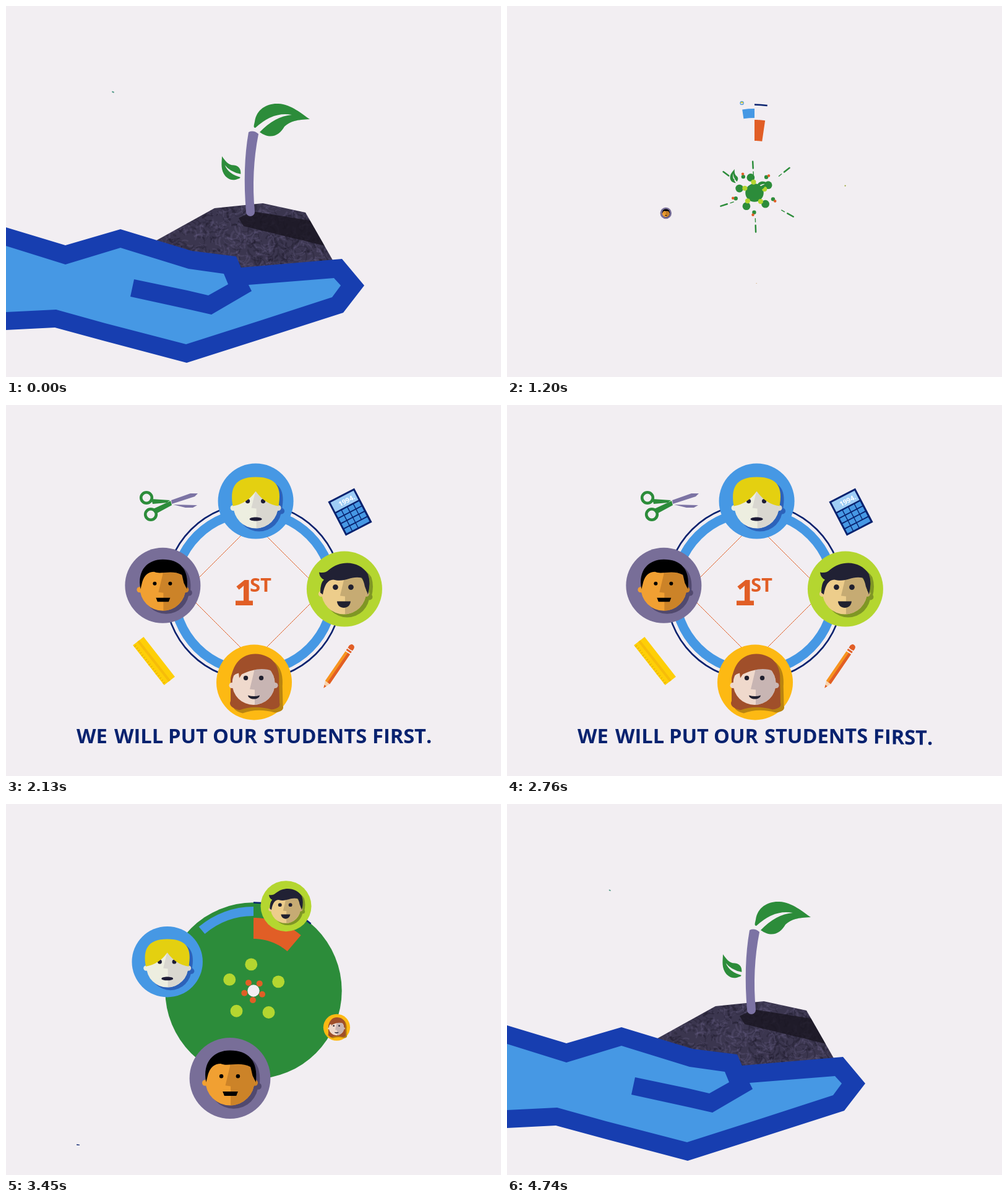
An HTML page with a canvas that plays this animation: 800x600 px, repeating every 5.4 s.

```html
<!DOCTYPE html>
<html lang="en">
<head>
<meta charset="utf-8">
<title>Growing students</title>
<style>
html, body { margin: 0; width: 100%; height: 100%; overflow: hidden; background: #f2eef2; }
canvas { display: block; width: 800px; height: 600px; }
</style>
</head>
<body>
<canvas id="stage" width="800" height="600"></canvas>
<script>
const ctx = document.getElementById('stage').getContext('2d');
const BG = '#f2eef2', GREEN = '#2c8c3a', LIME = '#b4d630', ORANGE = '#e15e26';
const NAVY = '#08226f', BLUE = '#4698e4', ROYAL = '#173eb0';
const LOOP = 5400, TURN = 4770, CX = 400, CY = 302, TAU = Math.PI * 2;

const clamp = x => Math.max(0, Math.min(1, x));
const mix = (a, b, k) => a + (b - a) * k;
const span = (u, a, b) => clamp((u - a) / (b - a));
const smooth = (u, a, b) => { const x = span(u, a, b); return x * x * (3 - 2 * x); };
const rad = deg => deg * Math.PI / 180;
const backOut = x => 1 + 2.2 * (x - 1) ** 3 + 1.2 * (x - 1) ** 2;

// Each key is [time, value, value, ...]
function track(u, keys) {
  let i = 1;
  while (i < keys.length - 1 && u > keys[i][0]) i++;
  const a = keys[i - 1], b = keys[i], k = span(u, a[0], b[0]);
  return a.slice(1).map((v, n) => mix(v, b[n + 1], k));
}

function disc(x, y, r, color) {
  if (r <= 0) return;
  ctx.fillStyle = color;
  ctx.beginPath();
  ctx.arc(x, y, r, 0, TAU);
  ctx.fill();
}

function poly(points, color) {
  ctx.fillStyle = color;
  ctx.beginPath();
  points.forEach(p => ctx.lineTo(p[0], p[1]));
  ctx.closePath();
  ctx.fill();
}

function box(x, y, w, h, color) {
  ctx.fillStyle = color;
  ctx.fillRect(x, y, w, h);
}

function placed(x, y, angle, scale, draw) {
  if (scale <= 0.001) return;
  ctx.save();
  ctx.translate(x, y);
  ctx.rotate(rad(angle));
  ctx.scale(scale, scale);
  draw();
  ctx.restore();
}

// ---- hand, soil and plant ----

// x, y, vertical shift when the hand flexes
const HAND = [[0,358,5],[96,387,7],[185,361,6],[300,396,3],[372,405,2],[380,423,1],[543,409,-11],
  [579,452,-14],[545,496,-11],[408,540,-1],[292,577,-5],[160,542,4],[79,520,8],[0,524,6]];
const PALM = [[0,388,5],[96,418,7],[185,391,6],[295,425,2],[352,433,1],[359,450,1],[327,468,1],[293,460,1],
  [207,442,3],[201,470,2],[297,491,-3],[332,499,-2],[397,461,0],[392,451,-1],[530,440,-11],[541,452,-11],
  [527,471,-10],[410,509,0],[291,547,-5],[160,513,4],[81,491,8],[0,495,6]];
const flexed = (shape, k) => shape.map(([x, y, d]) => [x, y + d * k]);

const soilTexture = (() => {
  const c = document.createElement('canvas'), g = c.getContext('2d');
  c.width = 300; c.height = 120;
  let seed = 7;
  const rnd = () => (seed = seed * 16807 % 2147483647) / 2147483647;
  g.fillStyle = '#3b364f';
  g.fillRect(0, 0, 300, 120);
  for (let i = 0; i < 900; i++) {
    const x = rnd() * 300, y = rnd() * 120, a = rnd() * TAU, len = 3 + rnd() * 9;
    g.strokeStyle = rnd() < 0.52 ? 'rgba(112,103,145,.22)' : 'rgba(22,19,34,.26)';
    g.lineWidth = 0.6 + rnd() * 3;
    g.beginPath();
    g.moveTo(x, y);
    g.quadraticCurveTo(x + len * Math.cos(a + 0.6), y + len * Math.sin(a + 0.6),
      x + 1.6 * len * Math.cos(a), y + 1.6 * len * Math.sin(a));
    g.stroke();
  }
  return c;
})();

const LEAF = new Path2D('M-2-3C-6-3-4-8-3-13C0-34 18-43 35-42C57-41 73-25 86-17C65-16 55-14 45-5C37 9 23 17 5 4Q30-22 57-24Q27-30-2-3Z');
const leaf = (x, y, angle, scale) => placed(x, y, angle, scale, () => {
  ctx.fillStyle = GREEN;
  ctx.fill(LEAF);
});

function stem(top) {
  if (top > 328) return;
  const k = (333 - top) / 125;
  ctx.fillStyle = '#7c73a4';
  ctx.beginPath();
  ctx.moveTo(388, 333);
  ctx.quadraticCurveTo(mix(387, 382, k), mix(333, 262, k), mix(388, 392, k), top - 3);
  ctx.quadraticCurveTo(mix(394, 400, k), top - 7, mix(402, 408, k), top);
  ctx.quadraticCurveTo(mix(400, 396, k), mix(333, 268, k), 402, 333);
  ctx.arc(395, 333, 7, 0, Math.PI);
  ctx.fill();
}

function garden(u) {
  if (u > 1150) return;
  const k = smooth(u, 170, 790), fall = span(u, 840, 1130) ** 2 * 300;
  ctx.save();
  ctx.translate(0, fall);
  ctx.save();
  ctx.beginPath();
  [[236,383],[337,327],[415,319],[484,334],[mix(532,527,k),418],[380,440],[240,440]].forEach(p => ctx.lineTo(...p));
  ctx.clip();
  ctx.drawImage(soilTexture, 236, 318);
  const reach = 1 - smooth(u, 830, 940);
  poly([[376,343],[398,332],[mix(400,mix(492,463,k),reach),347],[mix(395,mix(516,457,k),reach),mix(388,374,k)],[384,356]], 'rgba(24,21,32,.8)');
  ctx.restore();
  stem(track(u, [[170,207],[450,222],[810,278],[930,335]])[0]);
  poly(flexed(HAND, k), ROYAL);
  poly(flexed(PALM, k), BLUE);
  ctx.restore();
}

function leaves(u) {
  if (u > 1320) return;
  leaf(...track(u, [[170,405,200,0,1],[480,406,212,3,1],[810,402,237,-7.5,1],[1200,405,294,0,.25],[1320,400,302,0,0]]));
  leaf(...track(u, [[170,379,275,-122,.5],[500,372,265,-124,.5],[620,345,200,-145,.5],[710,284,172,-180,.48],
    [810,234,204,-211,.46],[960,240,270,-190,.4],[1200,370,285,-86,.25],[1290,400,302,-50,0]]));
  const grow = span(u, 570, 740), fade = span(u, 790, 960);
  if (grow > fade && u < 960) {
    ctx.strokeStyle = LIME;
    ctx.lineWidth = 4;
    ctx.beginPath();
    ctx.moveTo(367, 263);
    ctx.bezierCurveTo(350, 180, 323, 166, 274, 173);
    ctx.setLineDash([0, 150 * fade, 150 * (grow - fade), 300]);
    ctx.stroke();
    ctx.setLineDash([]);
  }
  if (u < 150) placed(mix(173, 138, u / 150), 139 + u / 60, 25, 1 - u / 160, () => {
    ctx.fillStyle = '#4a9583';
    ctx.fillRect(-1.5, -1, 3.5, 2);
  });
}

// ---- bursts ----

const around = (x, y, r, start, step, draw) => {
  for (let i = 0; i < 5; i++) {
    const a = rad(start + step * i);
    draw(x + r * Math.cos(a), y + r * Math.sin(a));
  }
};

function dashes(u) {
  if (u < 700 || u > 1270) return;
  const [r, len, width, y] = track(u, [[700,20,0,1,345],[810,128,22,5,350],[960,245,22,5,345],[1200,58,11,2.5,306],[1270,35,4,2,302]]);
  ctx.strokeStyle = GREEN;
  ctx.lineCap = 'round';
  [-38, 29, 88, 162, 217, 267].forEach((deg, i) => {
    placed(400, y, deg, 1, () => {
      const far = r * [1.15, 1.15, .94, .9, 1, .85][i];
      const line = (a, b, w) => {
        ctx.lineWidth = w;
        ctx.beginPath();
        ctx.moveTo(a, 0);
        ctx.lineTo(b, 0);
        ctx.stroke();
      };
      line(far - len / 2, far + len / 2, width);
      if (u > 1100) line(far - len * 1.5, far - len, 1.4);
    });
  });
  ctx.lineCap = 'butt';
}

function burst(u) {
  if (u < 690 || u > 1480) return;
  dashes(u);
  const [r] = track(u, [[1120,0],[1200,14],[1245,48],[1320,144],[1480,144]]);
  const [x, y] = track(u, [[810,392,342],[1050,400,302],[1480,400,302]]);
  const [g, size] = track(u, [[1080,0,0],[1200,25,6.3],[1260,45,10],[1320,45,0]]);
  around(CX, CY, g, -104, 75, (a, b) => disc(a, b, size, GREEN));
  around(CX, CY, g * 1.25, -53, 72, (a, b) => disc(a, b, size / 2, GREEN));
  disc(CX, CY, r, GREEN);
  const [ld, ls] = track(u, [[730,0,0],[810,62,11],[960,78,8],[1200,17,4],[1320,43,10],[1430,75,0]]);
  around(x, y, ld, -95, 75, (a, b) => disc(a, b, ls, LIME));
  const [od, os] = track(u, [[700,0,0],[810,4,4.5],[1000,45,3],[1200,36,2.2],[1320,15,5],[1400,30,0]]);
  around(x, y, od, -50, 72, (a, b) => disc(a, b, os, u < 900 ? '#f5812a' : ORANGE));
  if (u < 900) disc(x, y, track(u, [[700,0],[810,5],[900,0]])[0], '#ffdc82');
  disc(CX, CY, track(u, [[1285,0],[1320,10],[1350,45],[1450,147]])[0], BG);
}

// ---- wheel ----

function ring(r, width, color, sweep, dir) {
  ctx.strokeStyle = color;
  ctx.lineWidth = width;
  ctx.beginPath();
  ctx.arc(CX, CY, r, -TAU / 4, -TAU / 4 + dir * sweep * TAU, dir < 0);
  ctx.stroke();
}

function diamond(u, sweep) {
  const k = smooth(u, 1430, 1580), steps = 120;
  ctx.beginPath();
  for (let i = 0; i <= steps; i++) {
    const a = -TAU / 4 + sweep * TAU * i / steps, c = Math.cos(a), s = Math.sin(a);
    const r = mix(101, 111 / (Math.abs(c) + Math.abs(s)), k);
    ctx.lineTo(CX + r * c, CY + r * s);
  }
  if (sweep === 1) ctx.closePath();
  const tint = 0.19 * k * (1 - smooth(u, 1600, 1850));
  ctx.fillStyle = `rgba(228,72,72,${tint})`;
  ctx.fill();
  ctx.strokeStyle = ORANGE;
  ctx.lineWidth = mix(mix(34, 2.8, k), 1, smooth(u, 1600, 1900));
  ctx.stroke();
}

function first(u) {
  placed(CX, CY, 0, backOut(span(u, 1400, 1550)), () => {
    ctx.fillStyle = ORANGE;
    ctx.textAlign = 'left';
    ctx.font = 'bold 57px "Open Sans", sans-serif';
    ctx.fillText('1', -31, 22);
    ctx.fillRect(-29, 14.5, 28, 7.5);
    ctx.font = 'bold 31px "Open Sans", sans-serif';
    ctx.fillText('ST', -6, 0);
  });
}

function wheel(u) {
  if (u < 1140) return;
  const sweep = clamp((u - 957) / 625) ** 4;
  ring(142.5, 2.6, NAVY, sweep, 1);
  ring(128.5, 15, BLUE, sweep, -1);
  diamond(u, sweep);
  first(u);
  const glow = smooth(u, 1430, 1560) * (1 - smooth(u, 1620, 1850));
  if (glow) {
    ctx.globalAlpha = glow;
    ring(197, 1, '#e3dfe6', 1, 1);
    ctx.globalAlpha = 1;
  }
  if (u > 1480) {
    const [d] = track(u, [[1480,140],[1590,211.5],[1710,369],[1800,388],[1950,406]]);
    [-1, 1].forEach(s => box(CX + s * d - 2.5, 290, 5, 16, ORANGE));
  }
}

// ---- students ----

const STUDENTS = [
  { angle: 184, lag: 0, delay: -90, back: '#786e98', shade: '#51496e', skin: '#f1a032', dark: '#cc8328', ink: '#000',
    hair: '#000', face: [0, 4, 37], eyes: [-13, 12, -3, 3], mouth: 'M-11 20H12L9.5 26.5H-8.5Z',
    cut: 'M-36 6C-42-25-24-42 0-42C27-42 43-27 39 6L34-4L31-17C15-26-4-17-14-22Q-28-22-33-6Z' },
  { angle: 271.4, lag: 8, delay: -60, back: BLUE, shade: '#2c62ba', skin: '#edeee0', dark: '#d9d7d0', ink: '#1d1c36',
    hair: '#e4d010', face: [0, 8, 36], eyes: [-13, 12, 0, 3.6], mouth: 'M-10 29C-10 25 10 25 10 29C10 33-10 33-10 29Z',
    cut: 'M-37 8C-42-20-35-39 0-39C36-39 42-20 37 8Q15 5 0-16Q-14 4-37 8Z' },
  { angle: -1.75, lag: 15, delay: -30, back: LIME, shade: '#7f9625', skin: '#edcd8b', dark: '#c6ab73', ink: '#20202f',
    hair: '#212134', face: [-1, 5, 36], eyes: [-14.5, 10.5, -3, 4.4], mouth: 'M-12 20H10C9 34-11 34-12 20Z',
    cut: 'M-41-27Q-31-25-25-31C-5-48 25-45 38-24Q43-10 38 9L33-4Q31-14 28-18C10-22 2-10-18-15Q-31-15-35 9L-39 6Q-39-10-33-15Q-40-18-41-27Z' },
  { angle: 89.6, lag: 17, delay: 0, back: '#fdb913', shade: '#b98410', skin: '#efd9cc', dark: '#c8b5b3', ink: '#20202f',
    hair: '#a04f2a', face: [-1, 2, 34.5], eyes: [-13.5, 11.5, -7, 3.7], mouth: 'M-10 21Q0 24 9 21C8 29-9 29-10 21Z', long: true,
    cut: 'M-38 0C-36-30-20-46 2-46C28-45 43-28 40 0L35-4Q37-15 31-18C14-24 0-22-20-13L-24-7L-25-15Q-36-13-38 0Z' }
];
const LONG_HAIR = new Path2D('M-38-5C-36-40 36-42 40-8L41 33Q44 42 28 44Q0 36-24 45Q-43 40-38 30Z');
STUDENTS.forEach(s => { s.cut = new Path2D(s.cut); s.mouth = new Path2D(s.mouth); });

function portrait(s) {
  const [fx, fy, fr] = s.face, earY = fy + 3;
  const fill = (path, color) => { ctx.fillStyle = color; ctx.fill(path); };
  disc(0, 0, 61, s.back);
  ctx.save();
  ctx.translate(5.5, 5);
  disc(fx, fy, fr, s.shade);
  disc(fx + fr, earY, 5, s.shade);
  fill(s.cut, s.shade);
  if (s.long) fill(LONG_HAIR, s.shade);
  ctx.restore();
  if (s.long) fill(LONG_HAIR, s.hair);
  disc(fx - fr - 0.5, earY, 4.5, s.skin);
  disc(fx + fr + 0.5, earY, 4.5, s.dark);
  disc(fx, fy, fr, s.skin);
  ctx.save();
  ctx.beginPath();
  ctx.arc(fx, fy, fr, 0, TAU);
  ctx.clip();
  poly([[1,-40],[0,-18],[-7,11],[1,12],[1,50],[50,50],[50,-40]], s.dark);
  ctx.restore();
  const [left, right, ey, er] = s.eyes;
  disc(left, ey, er, s.ink);
  disc(right, ey, er, s.ink);
  fill(s.mouth, s.ink);
  fill(s.cut, s.hair);
}

function students(u) {
  if (u < 1100) return;
  const x = span(u, 1100, 1592);
  const p = 0.994 * (1 - (1 - x * x) ** 1.13) + 0.006 * smooth(u, 1590, 1900);
  STUDENTS.forEach(s => {
    const age = u - 1200 - s.delay;
    const r = 70 / (1 + Math.exp((140 - age) / 26)) - 9 * smooth(age, 230, 350);
    const a = rad(s.angle - 360 * p + s.lag * (1 - p));
    if (r > 0.25) placed(CX + 147 * Math.cos(a), CY + 146.5 * Math.sin(a), 0, r / 61, () => portrait(s));
  });
}

// ---- school tools ----

function scissors() {
  ctx.strokeStyle = GREEN;
  ctx.lineWidth = 4.6;
  [[-35, -13], [-28, 14]].forEach(([x, y]) => {
    ctx.beginPath();
    ctx.arc(x, y, 8.8, 0, TAU);
    ctx.stroke();
  });
  poly([[-27,-11],[3,-9],[-2,-5],[-25,-3]], GREEN);
  poly([[-24,5],[4,-8],[6,-1],[-18,12]], GREEN);
  poly([[5,-9],[36,-20],[48,-20],[43,-15],[6,-3]], '#7c73a4');
  poly([[8,-2],[47,-1],[40,3],[28,3]], '#7c73a4');
}

function calculator() {
  box(-24, -31, 48, 62, NAVY);
  box(-21, -28, 42, 17, '#9fcdf5');
  ctx.fillStyle = '#fff';
  ctx.font = 'bold 11px "Open Sans", sans-serif';
  ctx.textAlign = 'right';
  ctx.fillText('1994.', 18, -15);
  for (let row = 0; row < 4; row++) {
    for (let col = 0; col < 4; col++) {
      if (row === 3 && col === 3) continue;
      const wide = row === 3 && col === 2;
      box(-21 + col * 10.8, -8.5 + row * 9.6, wide ? 20.2 : 9.4, 7.8, BLUE);
    }
  }
}

function ruler() {
  box(-41, -11, 82, 22, '#fecf07');
  box(-41, -2, 82, 4, '#f6bd0a');
  for (let i = 0; i < 17; i++) box(-38 + i * 4.7, 7, 1, i % 4 ? 3 : 4, '#dfa90a');
}

function pencil() {
  poly([[-42,0],[-31,-4.5],[-31,4.5]], '#f8d3ae');
  poly([[-42,0],[-37,-2],[-37,2]], ORANGE);
  box(-31, -4.5, 58, 9, '#f7941e');
  box(-31, 0, 58, 4.5, ORANGE);
  box(29, -4.5, 3, 9, ORANGE);
  box(34, -4.5, 4, 9, ORANGE);
  disc(38, 0, 4.5, ORANGE);
}

const TOOLS = [[scissors,262,163,259,157,0,25],[calculator,556,173,548,170,-27.5,0],[ruler,239,414,235,404,52,5],[pencil,537,423,535,427,-55.7,0]];

function tools(u) {
  TOOLS.forEach(([draw, x, y, x0, y0, angle, delay]) => {
    const k = span(u - delay, 1555, 1855);
    const scale = k && backOut(k * k * (1 - k) + k * k) * clamp(k * 4) + 0.14 * clamp(k * 8) * (1 - k);
    placed(mix(x0, x, k), mix(y0, y, k), angle, scale, draw);
  });
}

// ---- caption ----

const WORDS = [['WE', 115], ['WILL', 176], ['PUT', 263], ['OUR', 335], ['STUDENTS', 417], ['FIRST.', 593]];

function lift(u, x) {
  const age = u - 1285 - (x - 115) / 1.33;
  if (age < 124) return mix(34, -18, smooth(age, 0, 124));
  return age < 300 ? mix(-18, 3, smooth(age, 124, 300)) : mix(3, 0, smooth(age, 300, 400));
}

function caption(u) {
  if (u < 1280) return;
  ctx.save();
  ctx.beginPath();
  ctx.rect(0, 0, 800, 552);
  ctx.clip();
  ctx.fillStyle = NAVY;
  ctx.textAlign = 'left';
  ctx.font = 'bold 32.6px "Open Sans", sans-serif';
  WORDS.forEach(([word, start]) => {
    let x = start - 1;
    for (const letter of word) {
      const w = ctx.measureText(letter).width, mid = x + w / 2;
      const slope = (lift(u, mid + 8) - lift(u, mid - 8)) / 32;
      ctx.save();
      ctx.transform(1, slope, 0, 1, mid, 546.5 + lift(u, mid));
      ctx.fillText(letter, -w / 2, 0);
      ctx.restore();
      x += w;
    }
  });
  ctx.restore();
}

// The second half of the loop plays the first half backwards.
function render(now) {
  const t = now % LOOP;
  const u = t < TURN / 2 ? t : Math.max(30, TURN - t);
  box(0, 0, 800, 600, BG);
  garden(u);
  burst(u);
  leaves(u);
  wheel(u);
  tools(u);
  students(u);
  caption(u);
}

const began = performance.now();
function frame() {
  render(performance.now() - began);
  requestAnimationFrame(frame);
}
frame();
</script>
</body>
</html>
```
